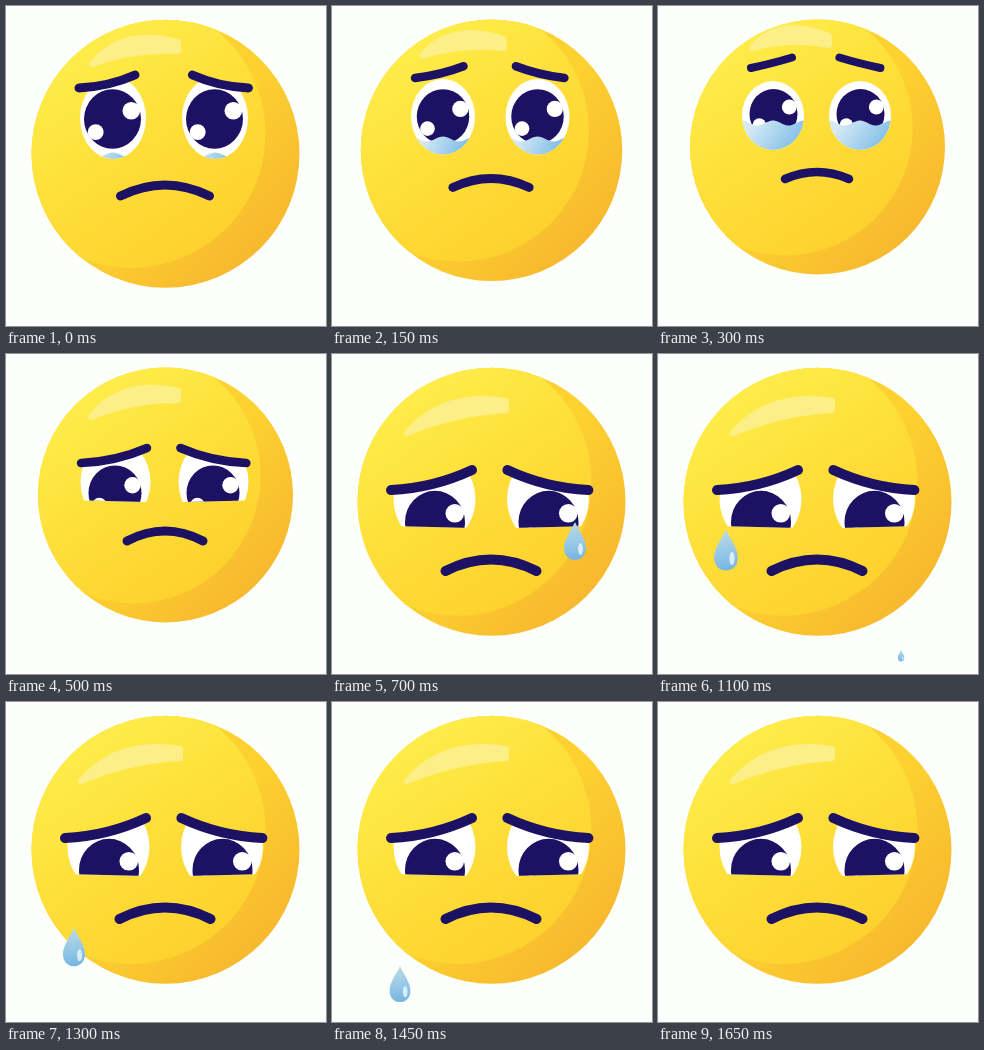
These frames come from a looping animation (320x320 px, 1700 ms). An HTML page with a canvas:

```html
<!DOCTYPE html>
<html>
<head>
<meta charset="utf-8">
<title>Sad face</title>
<style>
html, body { margin: 0; width: 100%; height: 100%; overflow: hidden; background: #fdfffd; }
canvas { display: block; }
</style>
</head>
<body>
<canvas id="stage" width="320" height="320"></canvas>
<script>
const ctx = document.getElementById('stage').getContext('2d');
const LOOP = 1700, STEP = 50, NAVY = '#1c1163', AXIS = 157.7;

const poses = [
  { t: 0, headY: 147.7, headR: 134, brow: [73, 82, 129, 69, 2.5, 9], eye: [107, 112, 33, 41], gap: 102,
    pupil: [106.5, 113, 28.5], lid: 162, water: 149, mouth: [44.5, 190, 168, 9], shine: [86, 58, 172, 36] },
  { t: 300, headY: 141, headR: 127.5, brow: [93, 62, 134, 51.5, 0.2, 8], eye: [115, 109.5, 31, 34.5], gap: 87,
    pupil: [115.5, 108, 24], lid: 152, water: 117, mouth: [32, 173, 159, 8.5], shine: [94, 42, 171, 30] },
  { t: 500, headY: 141, headR: 127.5, brow: [75, 109, 141, 94, 3, 8.5], eye: [109.5, 128, 35, 42], gap: 98,
    pupil: [109, 139, 26.5], lid: 148.5, water: 172, mouth: [38, 187, 167, 9], shine: [85, 63, 172, 37] },
  { t: 650, headY: 147.7, headR: 134, brow: [59, 136, 140, 116, 4, 10], eye: [102.5, 145, 41, 46], gap: 113.5,
    pupil: [103, 168, 30], lid: 174.5, water: 195, mouth: [45.5, 217, 194, 10], shine: [75, 79, 174, 47] }
];
// Each key: time, centre y, scale
const tears = [
  { x: 243, keys: [[550, 172, 0], [700, 188, 1], [1000, 255, 0.95], [1100, 302, 0.3], [1150, 312, 0]] },
  { x: 68, keys: [[950, 176, 0], [1100, 197, 1.08], [1450, 283, 0.95], [1550, 307, 0.4], [1600, 315, 0]] }
];

const mix = (a, b, k) => Array.isArray(a) ? a.map((v, i) => mix(v, b[i], k)) : a + (b - a) * k;

function poseAt(t) {
  const last = poses.length - 1;
  if (t >= poses[last].t) return poses[last];
  const i = poses.findIndex(p => p.t > t), a = poses[i - 1], b = poses[i];
  const u = (t - a.t) / (b.t - a.t), k = u * u * (3 - 2 * u), out = {};
  for (const name in a) out[name] = mix(a[name], b[name], k);
  return out;
}

function gradient(x0, y0, x1, y1, ...colors) {
  const g = ctx.createLinearGradient(x0, y0, x1, y1);
  colors.forEach((c, i) => g.addColorStop(i / (colors.length - 1), c));
  return g;
}

function oval(x, y, rx, ry, fill) {
  ctx.beginPath();
  ctx.ellipse(x, y, rx, ry, 0, 0, Math.PI * 2);
  ctx.fillStyle = fill;
  ctx.fill();
}

function curve(x0, y0, cx, cy, x1, y1, width) {
  ctx.beginPath();
  ctx.moveTo(x0, y0);
  ctx.quadraticCurveTo(cx, cy, x1, y1);
  ctx.lineWidth = width;
  ctx.strokeStyle = NAVY;
  ctx.stroke();
}

function head({ headY: y, headR: r, shine: [x0, y0, x1, y1] }) {
  const x = 159.5, s = r / 134;
  ctx.save();
  oval(x, y, r, r, gradient(x, y, x + r * 0.75, y + r * 0.75, '#fdd230', '#f7b72e'));
  ctx.clip();
  oval(x - 34 * s, y - 20 * s, r, r, gradient(x - r * 0.7, y - r * 0.7, x + r * 0.4, y + r * 0.9, '#feec48', '#fedc37', '#fdce2b'));
  ctx.restore();

  const mx = (x0 + x1) / 2, my = (y0 + y1) / 2;
  ctx.beginPath();
  ctx.moveTo(x0, y0);
  ctx.quadraticCurveTo(mx - 13, my - 26, x1, y1);
  ctx.lineTo(x1, y1 + 9);
  ctx.quadraticCurveTo(mx - 2, my - 4, x0, y0);
  ctx.closePath();
  ctx.fillStyle = ctx.strokeStyle = '#fdef88';
  ctx.lineWidth = 6;
  ctx.fill();
  ctx.stroke();
}

function browPoints([x0, y0, x1, y1, bow], mirrored) {
  const flip = x => mirrored ? 2 * AXIS - x : x;
  return [flip(x0), y0, flip((x0 + x1) / 2 + 2), (y0 + y1) / 2 + bow * 2, flip(x1), y1];
}

function eye(p, mirrored) {
  const dx = mirrored ? p.gap : 0, [ex, ey, rx, ry] = p.eye, [px, py, r] = p.pupil;
  const brow = browPoints(p.brow, mirrored), edge = mirrored ? 320 : 0;
  ctx.save();
  // Visible part lies between the brow and the lower lid
  ctx.beginPath();
  ctx.moveTo(edge, brow[1]);
  ctx.lineTo(brow[0], brow[1]);
  ctx.quadraticCurveTo(...brow.slice(2));
  ctx.lineTo(160, brow[5]);
  ctx.lineTo(160, p.lid);
  ctx.lineTo(edge, p.lid - 4);
  ctx.clip();
  oval(ex + dx, ey, rx, ry, '#fff');
  ctx.clip();
  const cx = px + dx;
  oval(cx, py, r, r * 1.04, NAVY);
  oval(cx + r * 0.66, py - r * 0.29, r * 0.31, r * 0.31, '#fff');
  oval(cx - r * 0.59, py + r * 0.46, r * 0.28, r * 0.28, '#fff');

  const left = ex + dx - rx, bottom = ey + ry;
  ctx.beginPath();
  ctx.moveTo(left, bottom + 5);
  for (let i = 0; i <= rx * 2; i += 2)
    ctx.lineTo(left + i, p.water - 2.5 * Math.cos(i / rx * Math.PI * 2));
  ctx.lineTo(left + rx * 2, bottom + 5);
  ctx.fillStyle = gradient(left + rx * 0.4, p.water, left + rx * 1.5, Math.max(bottom, p.water + 1), '#d6e9f5', '#86c1e8');
  ctx.fill();
  ctx.restore();
}

function tear({ x, keys }, t) {
  const i = keys.findIndex(k => k[0] > t);
  if (i < 1) return;
  const a = keys[i - 1], b = keys[i];
  const [, y, s] = mix(a, b, (t - a[0]) / (b[0] - a[0]));
  ctx.save();
  ctx.translate(x, y);
  ctx.scale(s, s);
  ctx.beginPath();
  ctx.moveTo(0, -20);
  ctx.bezierCurveTo(4, -11, 11, -3, 11, 6);
  ctx.bezierCurveTo(11, 22, -11, 22, -11, 6);
  ctx.bezierCurveTo(-11, -3, -4, -11, 0, -20);
  ctx.fillStyle = gradient(-3, -18, 3, 18, '#b9d9e8', '#98c9e6', '#74b5e3');
  ctx.fill();
  oval(5.5, 7, 2.4, 6, 'rgba(232,246,252,.85)');
  ctx.restore();
}

function draw(t) {
  const p = poseAt(t), [half, y, peak, width] = p.mouth;
  ctx.clearRect(0, 0, 320, 320);
  ctx.lineCap = ctx.lineJoin = 'round';
  head(p);
  for (const mirrored of [false, true]) {
    eye(p, mirrored);
    curve(...browPoints(p.brow, mirrored), p.brow[5]);
  }
  curve(159 - half, y, 159, peak, 159 + half, y, width);
  tears.forEach(d => tear(d, t));
}

function tick() {
  draw(Math.floor(performance.now() % LOOP / STEP) * STEP);
  requestAnimationFrame(tick);
}
tick();
</script>
</body>
</html>
```
